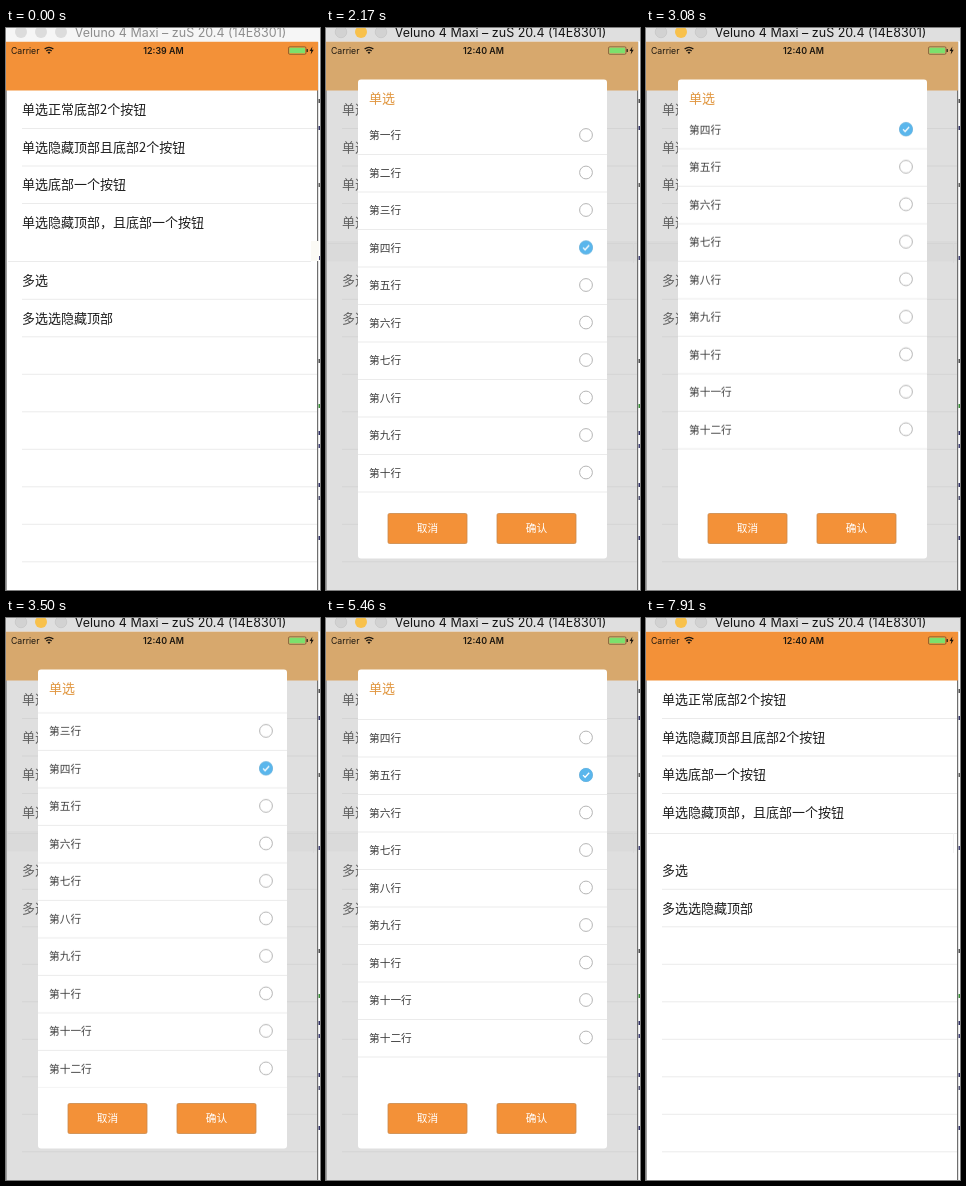
Animation, 314 px wide and 562 px high, one loop 8 s. Source, as an HTML page:

```html
<!DOCTYPE html>
<html lang="zh">
<head>
<meta charset="utf-8">
<title>单选</title>
<style>
html, body { margin: 0; width: 100%; height: 100%; overflow: hidden; background: #fff; }
svg { display: block; width: 100%; height: 100%; }
text { font-family: "Noto Sans CJK SC", "Noto Sans CJK", "Noto Sans", sans-serif; dominant-baseline: central; }
.latin { font-family: Inter, Roboto, sans-serif; dominant-baseline: alphabetic; }
.menu text { font-size: 13px; fill: #1c1c1c; }
.list text { font-size: 10.7px; fill: #3c3c3c; }
.rule { stroke: #ebebeb; stroke-width: 1; }
.radio { fill: #fff; stroke: #adadad; stroke-width: .9; }
.tick { fill: none; stroke: #fff; stroke-width: 1.3; }
.button text { font-size: 10.7px; fill: #fff; text-anchor: middle; }

.before39, .after39, .idle, .active, .press, .shade, .popup, .scroll, .fourth, .fifth {
  animation: 8s linear infinite;
}
.before39 { animation-name: hideClock; }
.after39 { animation-name: showClock; }
.idle { animation-name: hideIdle; }
.active { animation-name: showActive; }
.press { animation-name: press; }
.shade { animation-name: shade; }
.popup { animation-name: popup; }
.scroll { animation-name: scroll; }
.fourth { animation-name: fourth; }
.fifth { animation-name: fifth; }

@keyframes hideClock { 0%, 6.99% { opacity: 1 } 7%, 100% { opacity: 0 } }
@keyframes showClock { 0%, 6.99% { opacity: 0 } 7%, 100% { opacity: 1 } }
@keyframes hideIdle { 0%, 11.36% { opacity: 1 } 11.37%, 100% { opacity: 0 } }
@keyframes showActive { 0%, 11.36% { opacity: 0 } 11.37%, 100% { opacity: 1 } }
@keyframes press { 0%, 12.2% { opacity: 0 } 12.25%, 16.2% { opacity: 1 } 21%, 100% { opacity: 0 } }
@keyframes shade { 0%, 13.1% { opacity: 0 } 19.5%, 88.4% { opacity: 1 } 93.6%, 100% { opacity: 0 } }
@keyframes popup { 0%, 13.1% { opacity: 0 } 15.2%, 88.4% { opacity: 1 } 92.5%, 100% { opacity: 0 } }
@keyframes scroll {
  0%, 29% { transform: translateY(0); animation-timing-function: ease-out }
  32.375% { transform: translateY(6px); animation-timing-function: ease-in-out }
  38.5% { transform: translateY(-118.5px); animation-timing-function: ease-out }
  44% { transform: translateY(-69px) }
  47% { transform: translateY(-69px); animation-timing-function: ease-out }
  52.5%, 64.8% { transform: translateY(-55px); animation-timing-function: ease-out }
  68.25% { transform: translateY(-100px); animation-timing-function: ease-out }
  69.5% { transform: translateY(-103px); animation-timing-function: ease-in-out }
  75%, 100% { transform: translateY(-69px) }
}
@keyframes fourth { 0%, 61.2% { opacity: 1 } 61.25%, 100% { opacity: 0 } }
@keyframes fifth { 0%, 61.2% { opacity: 0 } 61.25%, 100% { opacity: 1 } }
</style>
</head>
<body>
<svg viewBox="0 0 314 562">
  <defs>
    <clipPath id="viewport"><rect x="32" y="89" width="249" height="381"/></clipPath>
  </defs>
  <rect width="314" height="562" fill="#fff"/>
  <g id="edge"></g>

  <rect y="13.5" width="312" height="49" fill="#f39138"/>
  <rect class="press" x="1" y="63" width="310" height="37.5" fill="#d9d9d9"/>
  <g class="shade"><rect x="1" y="213" width="310" height="20.5" fill="#f7f7f7"/></g>
  <g class="idle">
    <path class="rule" d="M2 233.5H305"/>
    <rect x="305" y="213" width="8" height="20" fill="#fbfaf5"/>
  </g>
  <g class="active">
    <path class="rule" d="M2 215.5H311"/>
    <path d="M307.5 215V235" stroke="#f3f3f3"/>
  </g>
  <g class="menu" id="menu"></g>
  <g class="shade" fill-opacity=".44">
    <rect y="13.5" width="312" height="49" fill="#b4c6b2"/>
    <rect x="1" y="62.5" width="310" height="499.5" fill="#b6b6b6"/>
  </g>

  <g class="idle">
    <rect width="314" height="13.5" fill="#f6f6f6"/>
    <g fill="#dcdcdc"><circle cx="15" cy="4" r="6"/><circle cx="35" cy="4" r="6"/><circle cx="55" cy="4" r="6"/></g>
    <text class="latin bar" x="174.5" y="9" fill="#8e8e8e"></text>
  </g>
  <g class="active">
    <rect width="314" height="13.5" fill="#dfdfdf"/>
    <g fill="#d2d2d2" stroke="#c2c2c2" stroke-width=".6"><circle cx="15" cy="4" r="5.8"/><circle cx="55" cy="4" r="5.8"/></g>
    <circle cx="35" cy="4" r="6" fill="#f8c14c"/>
    <text class="latin bar" x="174.5" y="9" fill="#141414"></text>
  </g>

  <g fill="#1c1710">
    <text class="latin" x="5" y="26" font-size="8.7">Carrier</text>
    <path d="M38.6 21.1Q43 17.5 47.4 21.1M40.3 23Q43 20.8 45.7 23" fill="none" stroke="#1c1710" stroke-width="1.3"/>
    <path d="M41.5 24.4Q43 23.2 44.5 24.4L43 26Z"/>
    <g font-size="8.9" font-weight="600" text-anchor="middle">
      <text class="latin before39" x="157.5" y="26">12:39 AM</text>
      <text class="latin after39" x="157.5" y="26">12:40 AM</text>
    </g>
    <rect x="282.5" y="18.8" width="17.5" height="7.5" rx="1.3" fill="none" stroke="#5a4328" stroke-width=".6"/>
    <rect x="283.5" y="19.8" width="15.5" height="5.5" rx=".6" fill="#7ce06c"/>
    <rect x="300.6" y="21" width="1.2" height="3" rx=".5"/>
    <path d="M306.4 18.6L303.6 23H305.3L304.7 26.4L307.7 21.8H305.9Z"/>
  </g>

  <g class="popup">
    <rect x="32" y="51.5" width="249" height="479" rx="3" fill="#fff"/>
    <text x="43" y="69.5" font-size="13" fill="#e0963f">单选</text>
    <g clip-path="url(#viewport)"><g class="list scroll" id="list"></g></g>
    <g id="buttons"></g>
  </g>
</svg>
<script>
const fill = (id, html) => { document.getElementById(id).innerHTML = html; };
const rule = (x1, x2, y) => `<path class="rule" d="M${x1} ${y}H${x2}"/>`;
const label = (x, y, text) => `<text x="${x}" y="${y}">${text}</text>`;
const ROW = 37.5;

for (const bar of document.querySelectorAll('.bar')) {
  bar.textContent = 'Veluno 4 Maxi – zuS 20.4 (14E8301)';
  bar.setAttribute('font-size', 12.5);
  bar.setAttribute('text-anchor', 'middle');
}

const single = ['单选正常底部2个按钮', '单选隐藏顶部且底部2个按钮', '单选底部一个按钮', '单选隐藏顶部，且底部一个按钮'];
const multiple = ['多选', '多选选隐藏顶部'];
let menu = single.map((name, i) => label(16, 80.7 + i * ROW, name) + (i < 3 ? rule(16, 311, 100.5 + i * ROW) : '')).join('');
menu += multiple.map((name, i) => label(16, 251.7 + i * ROW, name)).join('');
for (let i = 0; i < 8; i++) menu += rule(16, 311, 271.3 + i * ROW);
fill('menu', menu);

const disc = (y, name) => `<g class="${name}" transform="translate(260 ${y})">
  <circle r="6.9" fill="#5ab6ec"/><path class="tick" d="M-3 .1L-.9 2.2L3.2 -2.2"/></g>`;
const numerals = '一 二 三 四 五 六 七 八 九 十 十一 十二'.split(' ');
const picked = { 3: 'fourth', 4: 'fifth' };
fill('list', numerals.map((n, i) => {
  const y = 107 + i * ROW;
  return label(43, y - .4, `第${n}行`) + `<circle class="radio" cx="260" cy="${y}" r="6.4"/>`
    + (picked[i] ? disc(y, picked[i]) : '') + rule(32, 281, y + 19.5);
}).join(''));

fill('buttons', [['取消', 62], ['确认', 171]].map(([name, x]) => `<g class="button">
  <rect x="${x}" y="485.5" width="79" height="30" rx="1.5" fill="#f39138" stroke="#c98a4c" stroke-width=".8"/>
  ${label(x + 39.5, 499.7, name)}</g>`).join(''));

const marks = [[71, '#555'], [98, '#336'], [155, '#666'], [228, '#447'], [331, '#555'], [376, '#3a8f3a'],
  [403, '#336'], [416, '#447'], [455, '#336'], [468, '#557'], [508, '#336']];
fill('edge', '<path d="M.5 14V562" stroke="#a0a0a0"/><path d="M311.6 14V562" stroke="#6f6f6f" stroke-width="1.2"/>'
  + marks.map(([y, color]) => `<rect x="312.5" y="${y}" width="1.5" height="4" fill="${color}"/>`).join(''));
</script>
</body>
</html>
```
